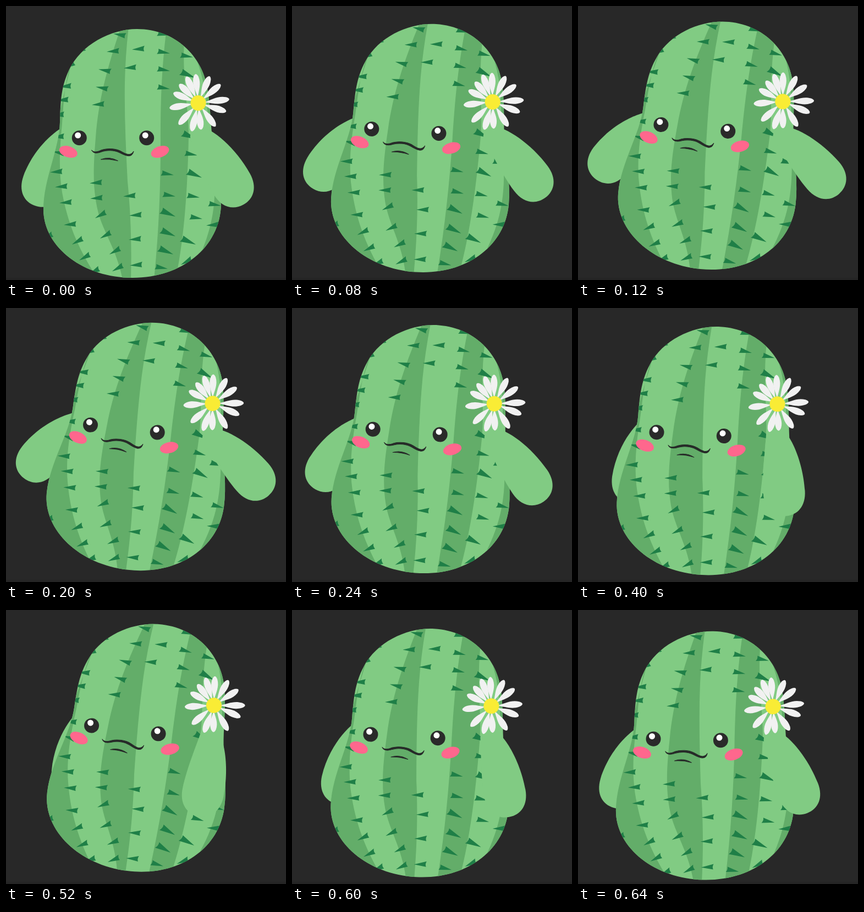
Recreate the animation shown at these times as an HTML page without scripts. Size 509 by 500 pixels, loop 680 ms.

```html
<!DOCTYPE html>
<html lang="en">
<head>
<meta charset="utf-8">
<title>Dancing cactus</title>
<style>
  @property --sway { syntax: "<angle>"; inherits: true; initial-value: 0deg; }
  @property --swing { syntax: "<angle>"; inherits: true; initial-value: 0deg; }

  html, body { margin: 0; height: 100%; overflow: hidden; background: #282828; }
  svg { display: block; width: 100vw; height: 100vh; }

  /* 17 poses of 40 ms: the body sways twice while the arms swing once */
  .cactus {
    transform: rotate(var(--sway));
    transform-origin: 388px 408px;
    animation: dance 680ms steps(1) infinite;
  }
  .left-arm {
    transform: translate(103px, 221px) rotate(calc(19.2deg + .67 * var(--swing)));
  }
  .right-arm {
    transform: translate(358px, 229.5px) rotate(calc(-28.9deg - var(--swing)));
  }
  @keyframes dance {
    0%     { --sway: 0deg;    --swing: 0deg; animation-timing-function: steps(4); }
    23.52% { --sway: 7.5deg;  --swing: 23deg; }
    29.41% { --sway: 6.4deg;  --swing: 18.2deg; animation-timing-function: steps(3); }
    47.05% { --sway: .65deg;  --swing: -7.4deg; }
    52.94% { --sway: 1.4deg;  --swing: -15deg; }
    58.82% { --sway: 3.2deg;  --swing: -22.2deg; animation-timing-function: steps(2); }
    70.58% { --sway: 6.9deg;  --swing: -34deg; }
    76.47% { --sway: 7deg;    --swing: -33.5deg; animation-timing-function: steps(3); }
    94.11% { --sway: 1.25deg; --swing: -6.6deg; }
    100%   { --sway: 0deg;    --swing: 0deg; }
  }

  .skin { fill: #81cb83; }
  .stripes { fill: #63ad69; }
  .thorns path { fill: none; }
  .flat   { marker: url(#flat); }
  .down   { marker: url(#down); }
  .up     { marker: url(#up); }
  .right  { marker: url(#right); }
  .steep  { marker: url(#steep); }
  .ink { fill: #2a2a2a; }
  .mouth { fill: #262a28; stroke: #262a28; stroke-linejoin: round; }
  .cheeks { fill: #ff678d; }
  .petals { fill: #f1f1f1; }
</style>
</head>
<body>
<svg viewBox="0 0 509 500" preserveAspectRatio="none">
  <defs>
    <path id="body" d="M238 42C308 42 357 92 366 150C372 185 372 220 376 248C382 285 392 325 391 362C389 440 320 496 230 496C143 496 69 442 68 372C68 315 97 262 98 212C99 180 99 150 114 118C136 70 191 42 238 42Z"/>
    <clipPath id="inside"><use href="#body"/></clipPath>
    <path id="thorn" fill="#1f7f47" d="M-12 1L11-5Q8 0 10 5Z"/>
    <path id="petal" d="M10 0C24-3 34-9 48-4.500Q58 0 48 4.500C34 9 24 3 10 0Z"/>
    <marker id="flat" orient="-2" markerUnits="userSpaceOnUse" overflow="visible"><use href="#thorn"/></marker>
    <marker id="down" orient="12" markerUnits="userSpaceOnUse" overflow="visible"><use href="#thorn"/></marker>
    <marker id="up" orient="-27" markerUnits="userSpaceOnUse" overflow="visible"><use href="#thorn"/></marker>
    <marker id="right" orient="192" markerUnits="userSpaceOnUse" overflow="visible"><use href="#thorn"/></marker>
    <marker id="steep" orient="205" markerUnits="userSpaceOnUse" overflow="visible"><use href="#thorn" transform="scale(1.25)"/></marker>
  </defs>

  <rect width="509" height="500" fill="#282828"/>
  <rect y="496" width="509" height="4" fill="#252525"/>

  <g class="cactus">
    <path class="skin left-arm" d="M8-8C0-2-36 40-38 108C-38 136-22 152 0 152S38 136 38 108C38 60 30 20 26 0Z"/>
    <use href="#body" class="skin"/>

    <g clip-path="url(#inside)">
      <g class="stripes">
        <path d="M121 96C105 140 105 180 102 215C97 265 96 300 102 340C112 395 130 440 162 490L40 500V210L96 200Z"/>
        <path d="M209 38C185 110 168 170 163 240C158 300 158 335 167 374C176 412 202 445 212 500H227C229 430 226 370 221 320C218 260 215 200 216 140Q217 90 223 38Z"/>
        <path d="M292 40C282 120 281 180 281 250C281 330 278 410 269 500H308C325 420 330 330 332 240C333 190 320 140 324 60Z"/>
        <path d="M340 84Q361 125 367 200L380 200V84Z"/>
        <path d="M375 270C382 330 384 380 355 450L410 440V270Z"/>
      </g>
      <g class="thorns">
        <path class="flat" d="M195 82L168 179L164 322L165 350L226 112L241 78L225 346L236 381L235 425L237 472L108 146L103 171L95 198L95 238L92 302L101 329L109 358L117 398L376 399"/>
        <path class="down" d="M180 117L175 149L96 267L207 52"/>
        <path class="up" d="M172 381L181 418L198 447L203 478L130 429L143 458L75 421L115 108L134 81L160 484L328 466"/>
        <path class="right" d="M286 52L286 85L286 117L286 150L293 307L296 346L282 478L328 92L336 271L340 348L345 387L379 363L368 287"/>
        <path class="steep" d="M294 379L294 415L290 448L330 126L333 238L342 308L331 430"/>
      </g>
    </g>

    <g class="ink">
      <circle cx="133.3" cy="240.7" r="13.5"/>
      <circle cx="255.7" cy="240.7" r="13.5"/>
    </g>
    <g fill="#fff">
      <circle cx="130.7" cy="236" r="5.5"/>
      <circle cx="253.2" cy="236" r="5.5"/>
    </g>
    <g class="cheeks">
      <ellipse rx="17" ry="10" transform="translate(113.3 266)rotate(18)"/>
      <ellipse rx="17" ry="10" transform="translate(280 266)rotate(-20)"/>
    </g>
    <g class="mouth">
      <path d="M155.500 263C160 268 167 266 173 263C183 259.500 198 259.500 208 264.500C217 269.500 226 275 232 265C229 279 217 273 206 267.500C196 262.500 183 263 174 266C166 269 159 270 155.500 263Z"/>
      <path d="M172.500 280Q188 274 203.500 282.500Q188 278.500 172.500 280Z"/>
    </g>

    <path class="skin right-arm" d="M-8-12C14-12 38 50 38 108C38 136 22 152 0 152S-38 136-38 108C-38 70-28 20-26 0Q-22-12-8-12Z"/>

    <g transform="translate(349.5 177)">
      <g class="petals">
        <use href="#petal" transform="rotate(-95)"/>
        <use href="#petal" transform="rotate(-67)"/>
        <use href="#petal" transform="rotate(-40)"/>
        <use href="#petal" transform="rotate(-7)scale(1.07 1)"/>
        <use href="#petal" transform="rotate(17)"/>
        <use href="#petal" transform="rotate(54)"/>
        <use href="#petal" transform="rotate(84)scale(.92 1)"/>
        <use href="#petal" transform="rotate(103)"/>
        <use href="#petal" transform="rotate(132)"/>
        <use href="#petal" transform="rotate(170)"/>
        <use href="#petal" transform="rotate(202)scale(.92 1)"/>
        <use href="#petal" transform="rotate(225)scale(.92 1)"/>
        <use href="#petal" transform="rotate(246)"/>
      </g>
      <circle r="14" fill="#f9ec35"/>
    </g>
  </g>
</svg>
</body>
</html>
```
